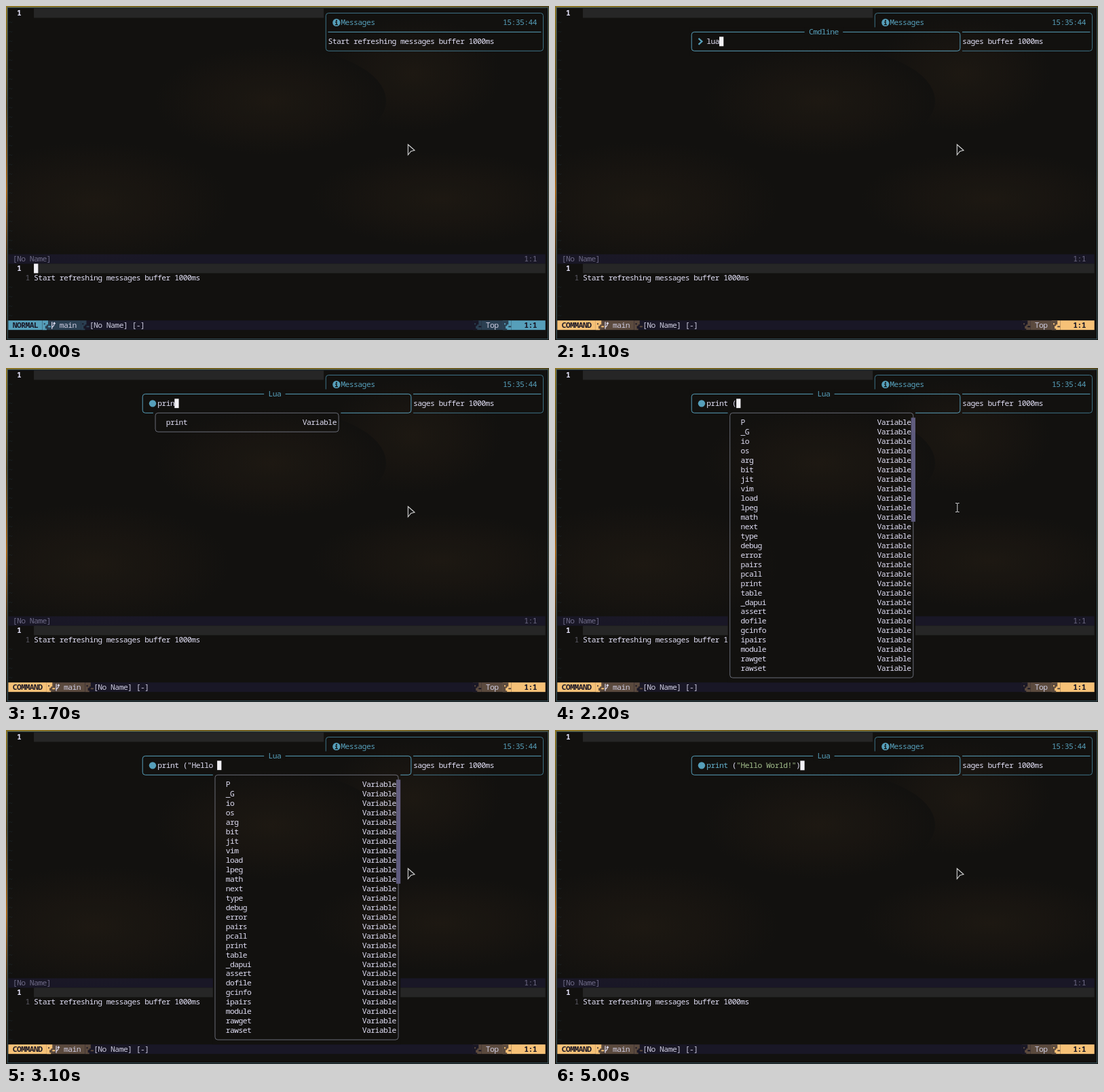
An HTML page for the animation above (8 s loop, 800 by 493 pixels).

```html
<!DOCTYPE html>
<html lang="en">
<head>
<meta charset="utf-8">
<title>Command line demo</title>
<style>
  html, body { margin: 0; width: 100%; height: 100%; overflow: hidden; background: #12110f; }
  svg { display: block; width: 800px; height: 493px; }
  text {
    font: 11.4px 'Noto Sans Mono', 'DejaVu Sans Mono', monospace;
    letter-spacing: -.56px;
    white-space: pre;
  }
  .bold { font-weight: 700; }
  .glow { mix-blend-mode: screen; }
</style>
</head>
<body>
<svg viewBox="0 0 800 493">
  <defs>
    <linearGradient id="top">
      <stop offset="0" stop-color="#8a7426"/><stop offset=".35" stop-color="#6d5c1f"/>
      <stop offset=".7" stop-color="#7d6a28"/><stop offset="1" stop-color="#4c421c"/>
    </linearGradient>
    <linearGradient id="left" x2="0" y2="1">
      <stop offset="0" stop-color="#8a7426"/><stop offset=".3" stop-color="#54401a"/>
      <stop offset=".55" stop-color="#a5641a"/><stop offset=".75" stop-color="#4a3216"/>
      <stop offset="1" stop-color="#1d1a14"/>
    </linearGradient>
    <linearGradient id="right" x2="0" y2="1">
      <stop offset="0" stop-color="#4c421c"/><stop offset=".5" stop-color="#3b3018"/>
      <stop offset="1" stop-color="#1d1a14"/>
    </linearGradient>
    <radialGradient id="warm">
      <stop offset="0" stop-color="#0c0703"/><stop offset="1" stop-color="#000"/>
    </radialGradient>
  </defs>
  <rect width="800" height="493" fill="#12110f"/>
  <rect width="800" height="3" fill="url(#top)"/>
  <rect width="3" height="493" fill="url(#left)"/>
  <rect x="798" width="2" height="493" fill="url(#right)"/>
  <rect x="2.5" y="2.5" width="796" height="489" fill="#12110f" stroke="#36525c"/>
  <g id="scene"></g>
  <g class="glow" fill="url(#warm)">
    <ellipse cx="600" cy="100" rx="130" ry="85"/>
    <ellipse cx="390" cy="140" rx="170" ry="80"/>
    <ellipse cx="640" cy="285" rx="190" ry="70"/>
    <ellipse cx="130" cy="290" rx="200" ry="90"/>
  </g>
</svg>
<script>
const LOOP = 8000, KEY = 100;
const CW = 6.28, RH = 13.96;
const X = c => 3.4 + c * CW;
const Y = r => 3.5 + r * RH;
const MX = c => X(c) + CW / 2;
const MY = r => Y(r) + RH / 2;

const BG = '#12110f', BAR = '#191726', FG = '#e0def4', BLUE = '#569fba', LINE = '#262626';
const MODES = {
  NORMAL: { main: BLUE, soft: '#2b4052' },
  COMMAND: { main: '#f6c177', soft: '#5b4a3e' }
};
const WORDS = ('P _G io os arg bit jit vim load lpeg math next type debug error pairs pcall ' +
  'print table _dapui assert dofile gcinfo ipairs module rawget rawset').split(' ');

// Bursts of typing: start time and keys
const KEYS = [[1400, 'print '], [2200, '('], [2400, '"Hello '], [3300, 'World!'], [4300, '")']];
// Completion menu: from, to, column
const MENUS = [[1300, 2000, 34], [2000, 2400, 40], [3100, 3300, 48]];
const BEAMS = [[2100, 2400], [3500, 3600], [4100, 5000]];

const esc = s => s.replace(/&/g, '&amp;').replace(/</g, '&lt;');
const text = (c, r, s, fill = FG, cls = '') =>
  `<text x="${X(c)}" y="${MY(r) + 4}" fill="${fill}" class="${cls}">${esc(s)}</text>`;
const rect = (x, y, w, h, fill) =>
  `<rect x="${x}" y="${y}" width="${w}" height="${h}" fill="${fill}"/>`;
const cells = (c, r, cols, rows, fill) => rect(X(c), Y(r), cols * CW, rows * RH, fill);
const path = (d, stroke, fill = 'none', w = 1) =>
  `<path d="${d}" stroke="${stroke}" fill="${fill}" stroke-width="${w}"/>`;
const cursor = (c, r) => cells(c, r, 1, 1, '#f2f1f5');

// Rounded border through the middle of the outer cells
const box = (c0, r0, c1, r1, stroke) =>
  cells(c0, r0, c1 - c0 + 1, r1 - r0 + 1, BG) +
  `<rect x="${MX(c0)}" y="${MY(r0)}" width="${MX(c1) - MX(c0)}" height="${MY(r1) - MY(r0)}"
    rx="4" fill="none" stroke="${stroke}"/>`;

// Two cells of pixels thinning out from colour a to colour b
function fade(c, r, a, b) {
  let d = '', seed = 7;
  for (let i = 0; i < 6; i++) for (let j = 0; j < 7; j++) {
    seed = (seed * 73 + 41) % 997;
    if (seed / 997 > (i + .6) / 6.4) d += `M${X(c) + i * 2.09} ${Y(r) + j * 2}h2.1v2h-2.1z`;
  }
  return cells(c, r, 2, 1, b) + path(d, 'none', a);
}

function editor(mode) {
  let s = cells(6, 0, 120, 1, LINE) + text(2, 0, '1', FG, 'bold');
  for (let r = 1; r < 33; r++) if (r < 26 || r > 28) s += text(0, r, '~', '#1b2327');
  s += cells(0, 26, 126, 1, BAR) + text(1, 26, '[No Name]', '#6e6a86') + text(121, 26, '1:1', '#6e6a86');
  s += cells(6, 27, 120, 1, LINE) + text(2, 27, '1', FG, 'bold');
  if (mode === 'NORMAL') s += cursor(6, 27);
  return s + text(4, 28, '1', '#5c5a66') + text(6, 28, 'Start refreshing messages buffer 1000ms');
}

function status(mode) {
  const { main, soft } = MODES[mode], n = mode.length + 2, r = 33;
  const x = X(n + 2), y = Y(r);
  return cells(0, r, 126, 1, BAR) +
    cells(0, r, n, 1, main) + text(1, r, mode, BAR, 'bold') +
    fade(n, r, main, soft) + cells(n + 2, r, 7, 1, soft) +
    path(`M${x + 1.5} ${y + 2}v10.5M${x + 1.5} ${y + 10}q3.5 -2 3.5 -6M${x + 3.4} ${y + 5}l1.6 -2l1.4 2`, FG, 'none', 1.2) +
    text(n + 4, r, 'main', '#cdcbe0') + fade(n + 9, r, soft, BAR) +
    text(n + 11, r, '[No Name] [-]', '#cdcbe0') +
    fade(109, r, BAR, soft) + cells(111, r, 5, 1, soft) + text(112, r, 'Top', '#cdcbe0') +
    fade(116, r, soft, main) + cells(118, r, 8, 1, main) + text(121, r, '1:1', BAR, 'bold');
}

function message() {
  return box(74, 0, 125, 4, '#3f7488') +
    `<circle cx="486.8" cy="${MY(1)}" r="5.6" fill="${BLUE}"/>` +
    rect(485.9, MY(1) - 3.8, 2, 2, BG) +
    path(`M485 ${MY(1) - .6}h2v3.8M484.8 ${MY(1) + 3.2}h4.2`, BG, 'none', 1.4) +
    text(78, 1, 'Messages', BLUE) + text(116, 1, '15:35:44', BLUE) +
    path(`M${X(75)} ${MY(2)}H${X(125)}`, BLUE) +
    text(75, 3, 'Start refreshing messages buffer 1000ms');
}

function typedText(s) {
  const parts = s.match(/^(print)( \()("[^"]*")(\)?)$/);
  if (!parts) return text(35, 3, s);
  const [, name, open, str, close] = parts;
  return text(35, 3, name, close ? '#65b1cd' : FG) + text(40, 3, open) +
    text(42, 3, str, '#a3be8c') + text(42 + str.length, 3, close);
}

function cmdline(lua, typed) {
  const title = lua ? 'Lua' : 'Cmdline', c = lua ? 61 : 59;
  const icon = lua
    ? `<circle cx="216" cy="${MY(3)}" r="5.2" fill="${BLUE}"/>`
    : path(`M211.5 ${MY(3) - 4.5}l5 4.5l-5 4.5`, BLUE, 'none', 2.2);
  return box(31, 2, 94, 4, BLUE) + cells(c - 1, 2, title.length + 2, 1, BG) +
    text(c, 2, title, BLUE) + icon + typedText(typed) + cursor(35 + typed.length, 3);
}

function menu(c, prefix) {
  const items = WORDS.filter(w => w.toLowerCase().startsWith(prefix));
  if (!items.length) return '';
  let s = box(c, 4, c + 43, 5 + items.length, '#686b76');
  items.forEach((w, i) => { s += text(c + 3, 5 + i, w) + text(c + 35, 5 + i, 'Variable'); });
  return items.length < WORDS.length ? s : s + cells(c + 43, 5, 1, 11, '#5d5a7d');
}

const mouse = beam => beam
  ? path('M590 199.5h2l.8 .6l.8 -.6h2M590 212.5h2l.8 -.6l.8 .6h2M592.8 200v12', '#0a0a0a', 'none', 3) +
    path('M590 199.5h2l.8 .6l.8 -.6h2M590 212.5h2l.8 -.6l.8 .6h2M592.8 200v12', '#dcdcdc')
  : path('M592.3 204.5L602 213L596.6 214.4L592.3 219.8Z', '#d5d5d5', '#141414', 1.1);

const within = (list, t) => list.find(([a, b]) => t >= a && t < b);
const burst = (t, at, keys) => keys.slice(0, Math.max(0, Math.floor((t - at) / KEY) + 1));

function draw(t) {
  const command = t >= 400, lua = t >= 1200;
  const mode = command ? 'COMMAND' : 'NORMAL';
  const typed = lua ? KEYS.map(k => burst(t, ...k)).join('') : burst(t, 900, 'lua');
  const list = within(MENUS, t);
  let s = editor(mode) + status(mode) + message();
  if (command) s += cmdline(lua, typed);
  if (list) s += menu(list[2], t < 2000 ? typed.trim() : '');
  return s + mouse(within(BEAMS, t));
}

const scene = document.getElementById('scene');
const start = performance.now();
let shown = -1;
function tick() {
  const step = Math.floor((performance.now() - start) % LOOP / KEY);
  if (step !== shown) {
    shown = step;
    scene.innerHTML = draw(step * KEY);
  }
  requestAnimationFrame(tick);
}
tick();
</script>
</body>
</html>
```
